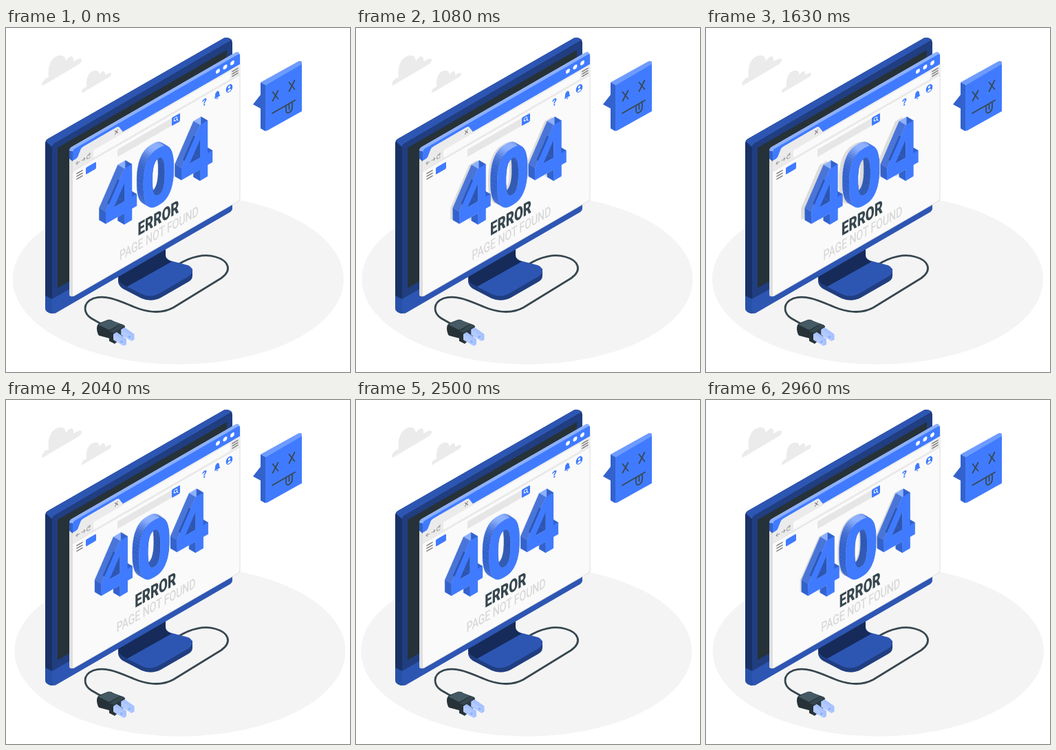
Animation, 500 px wide and 500 px high, one loop 3000 ms. Source, as an HTML page:

```html
<!DOCTYPE html>
<html lang="en">
<head>
<meta charset="utf-8">
<title>404</title>
<style>
html, body { margin: 0; width: 100%; height: 100%; overflow: hidden; background: #fff; }
svg { display: block; width: 100vw; height: 100vh; }
text { font-family: Roboto, "Liberation Sans", sans-serif; }
.line { fill: none; stroke-linecap: round; stroke-linejoin: round; }
</style>
</head>
<body>
<svg viewBox="0 0 500 500">
  <ellipse id="floor" cx="250.5" cy="365" rx="240.5" ry="124" fill="#f4f4f4"/>

  <!-- clouds -->
  <g fill="#ebebeb">
    <path id="cloud" d="M53 84Q51 80 55 76Q58 72 62 72Q60 56 67 46Q76 37 84 41Q87 44 87 48Q93 39 97 42Q99 45 98 49Q106 43 110 45Q111 48 107 52Z"/>
    <use href="#cloud" transform="translate(71 32) scale(.745)"/>
  </g>

  <!-- cable and plug -->
  <path class="line" stroke="#37474f" stroke-width="2.800" d="M250 344C268 332 289 328 304 332.500C324 338 329 352 313 363.500L243 406.500C229 414 211 414 193 408C171 400 148 386 127 393C110 400 113 415 124 422L138 430"/>
  <path fill="#263238" d="M132 436Q132 430 138 428L148 424Q152 423 156 426L172 432V446L158 459L150 455V451L135 447Q132 443 132 436Z"/>
  <path fill="#455a64" d="M134 431L148 424.500Q152 423 156 426L166 430L150 439Z"/>
  <path fill="#37474f" d="M150 441L167 430L173 433L157 443Z"/>
  <path fill="#2c3a41" d="M157 443L173 433V446L157 459Z"/>
  <g id="prong">
    <path fill="#a6c2ff" d="M156 445L161 442L175 452V460L171 462L156 453Z"/>
    <path fill="#b3caff" d="M156 445L171 454V462L156 453Z"/>
    <circle cx="168" cy="456" r="2" fill="#8cb0ff"/>
  </g>
  <use href="#prong" x="11.500" y="-7"/>

  <!-- stand -->
  <path fill="#203e80" d="M163 361V369Q164 375 170 379L197 393Q211 399 225 392L265 369Q271 366 271 360V350L230 350Z"/>
  <path fill="#2d56b3" d="M163 361L232 333Q236 338 242 339L265 345Q273 349 270 356Q268 360 262 363L224 385Q211 393 198 387L170 373Q163 369 163 361Z"/>
  <path fill="#162b59" d="M163 358L232 318V330Q232 337 241 339.500L176 376L170 373Q163 369 163 361Z"/>

  <!-- monitor -->
  <path fill="#1a3166" d="M57 168Q57 163 61 161L317 14.500Q323 12.500 328 17L329 22V263L67 415Q57 414 57 406Z"/>
  <path fill="#2751a8" d="M57 389L67 394V415Q57 414 57 406Z"/>
  <path fill="#2d56b3" d="M58 165L61 161L317 14.500Q323 12.500 328 17.500L70 168Q67 170 67 173Z"/>
  <path fill="#203e80" d="M67 173Q67 170 70 168L325 20Q329 18 329 23V262L71 413Q67 414 67 409Z"/>
  <path fill="#2d56b3" d="M67 394L329 243V262.500Q329 265.500 326 267.500L72 414.500Q67 416.500 67 410Z"/>
  <path fill="#263238" d="M75 174L321 32V235L75 378Z"/>

  <!-- browser window: u stays horizontal, v leans along the screen -->
  <g transform="matrix(1 -.577 0 1 0 1)">
    <path fill="#e0e0e0" d="M92 231Q92 227 96 227L336 227L340 233V445H97Q92 443 92 439Z"/>
    <rect x="96.500" y="232.500" width="243.500" height="213" rx="3" fill="#fafafa" stroke="#dedede"/>
    <path fill="#3362cc" d="M92 230L97 234V249L92 242Z"/>
    <path fill="#8cb0ff" d="M92 230Q92 227 95 227H334Q338 227 340 234H97Z"/>
    <path fill="#407bff" d="M97 235Q97 232 100 232H337Q340 232 340 235V248H97Z"/>
    <path fill="#ebebeb" d="M97 248H102Q105 247 106 243L108 239Q109 236 112 236H161Q164 236 165 239L170 248H340V263H97Z"/>
    <rect x="127" y="250" width="199" height="11" rx="2" fill="#fafafa"/>
    <path stroke="#dedede" d="M97 263.500H340"/>
    <g fill="#fff"><circle cx="308" cy="239.500" r="3"/><circle cx="318.500" cy="239.500" r="3"/><circle cx="329" cy="239.500" r="3"/></g>
    <g class="line" stroke="#757575">
      <path d="M158.500 240L162.500 245M162.500 240L158.500 245"/>
      <path stroke="#999" d="M107 255H102M104 253L102 255L104 257M110 255H115M113 253L115 255L113 257M122 253A2.500 3 0 1 0 122 257M122 251V254H120"/>
      <path stroke-width="1.500" d="M329 252H337M329 255.500H337M329 259H337"/>
      <path stroke-width="1.500" d="M103 270H111M103 274H111M103 278H111"/>
    </g>
    <rect x="116" y="269" width="15" height="10" rx="1.500" fill="#407bff"/>
    <rect x="162" y="269" width="80" height="11" fill="#e6e6e6"/>
    <rect x="241" y="268.500" width="12" height="12" rx="1.500" fill="#407bff"/>
    <g class="line" stroke="#fff"><circle cx="246.500" cy="273.500" r="2.300"/><path d="M248.500 275.500L250 277.500"/></g>
    <text x="285" y="278" font-size="13.500" font-weight="900" fill="#407bff">?</text>
    <path fill="#407bff" d="M303 277Q304 275 304 272Q304 268.500 306 268.500Q307 267 308 268.500Q310 269 310 272Q310 275 311.500 277ZM305.500 278H309Q307 281 305.500 278Z"/>
    <ellipse cx="324.500" cy="274" rx="4.800" ry="5.500" fill="#407bff"/>
    <circle cx="324.500" cy="272" r="1.700" fill="#fff"/>
    <path fill="#fff" d="M321.500 277.500Q324.500 272.500 327.500 277.500Q324.500 279.500 321.500 277.500Z"/>
  </g>

  <g id="shadow" fill="#dcdcdc" fill-rule="evenodd"></g>
  <g id="words">
    <text transform="matrix(.72 -.415 0 1 191.500 302.300)" font-size="26" font-weight="900" fill="#37474f">ERROR</text>
    <text transform="matrix(.72 -.415 0 1 165 338)" font-size="19.500" fill="#d6d6d6" stroke="#d6d6d6" stroke-width=".3">PAGE NOT FOUND</text>
  </g>
  <g id="digits" stroke-linejoin="round"></g>

  <!-- speech bubble -->
  <path fill="#3362cc" d="M370 97L359 111L370 117V146L377 150V82L370 79Z"/>
  <path fill="#6e9bff" d="M370 79L424 49Q427 47 430 49V53L377 83Z"/>
  <path fill="#407bff" d="M377 83L430 52.500V121L379 149.500Q377 150 377 148Z"/>
  <g class="line" stroke="#37474f" stroke-width="1.700" transform="translate(0 1)">
    <path d="M387.500 92L395.500 102M395.500 90L387.500 105M411.500 78L419.500 88M419.500 75L411.500 91"/>
    <path d="M387 123L420 104M407 112V119C407 126 416 121 416 114V107M411.500 110V117"/>
  </g>
</svg>
<script>
const SLOPE = .577, DEPTH = [-9.5, -5.5];
const $ = id => document.getElementById(id);

// Points on a rounded zero, centred at cx, cy
const ring = (cx, cy, rx, ry) => Array.from({ length: 56 }, (_, i) => {
  const a = i / 56 * 2 * Math.PI;
  const bend = n => Math.sign(n) * Math.abs(n) ** .8;
  const dx = rx * bend(Math.cos(a));
  return [cx + dx, cy + ry * bend(Math.sin(a)) - SLOPE * dx];
});
const four = [
  [[172, 204.5], [183, 198], [183, 245.5], [190, 241.5], [190, 258.5], [183, 262.5],
   [183, 279], [172, 285.5], [172, 269], [145, 284.5], [145, 267]],
  [[172, 226], [172, 252], [157, 260.5]]
];
const move = (loops, dx, dy) => loops.map(l => l.map(([x, y]) => [x + dx, y + dy]));
const path = loops => loops.map(l => 'M' + l.map(p => p.map(n => n.toFixed(1))).join('L') + 'Z').join('');

// Outer walls get lighter the more they face upwards; holes stay dark
function wall([x1, y1], [x2, y2], isHole) {
  const [ex, ey] = DEPTH, dx = x2 - x1, dy = y2 - y1 + SLOPE * dx;
  const up = isHole ? 0 : (dx / Math.hypot(dx, dy)) ** 2;
  const dark = isHole ? [45, 86, 179] : [51, 98, 204], light = [140, 176, 255];
  const rgb = dark.map((c, i) => Math.round(c + (light[i] - c) * up));
  const quad = [[x1, y1], [x2, y2], [x2 + ex, y2 + ey], [x1 + ex, y1 + ey]];
  return `<path d="${path([quad])}" fill="rgb(${rgb})" stroke="rgb(${rgb})" stroke-width=".4"/>`;
}
const solid = loops =>
  loops.map((l, hole) => l.map((p, i) => wall(p, l[(i + 1) % l.length], hole)).join('')).join('') +
  `<path d="${path(loops)}" fill="#407bff" fill-rule="evenodd"/>`;

const zero = [ring(221.7, 216, 22, 41.5), ring(221.7, 216, 9, 26.5)];
const number = [four, zero, move(four, 110, -63.5)];
$('digits').innerHTML = number.map(solid).join('');
$('shadow').innerHTML = number.map(d => `<path d="${path(move(d, ...DEPTH))}"/>`).join('');

const KEYS = [0, -1, 2, -4, 4, -4, 4, -4, 2, -1, 0];
function shake(p) {
  if (p <= 0) return 0;
  const k = p % 1 * 10, i = Math.floor(k);
  return KEYS[i] + (KEYS[i + 1] - KEYS[i]) * (k - i);
}
const slide = (id, x) => $(id).setAttribute('transform', `translate(${x.toFixed(2)} 0)`);

const start = performance.now(), STEP = 1000 / 24;
function draw() {
  const now = (performance.now() - start) % 3000;
  const t = Math.floor((now + 4) / STEP) * STEP % 3000 + 28;
  const s = shake((t - 500) / 3000);
  slide('floor', shake(t / 1500));
  slide('shadow', s);
  slide('words', 2 * s);
  slide('digits', 3 * s);
  requestAnimationFrame(draw);
}
draw();
</script>
</body>
</html>
```
